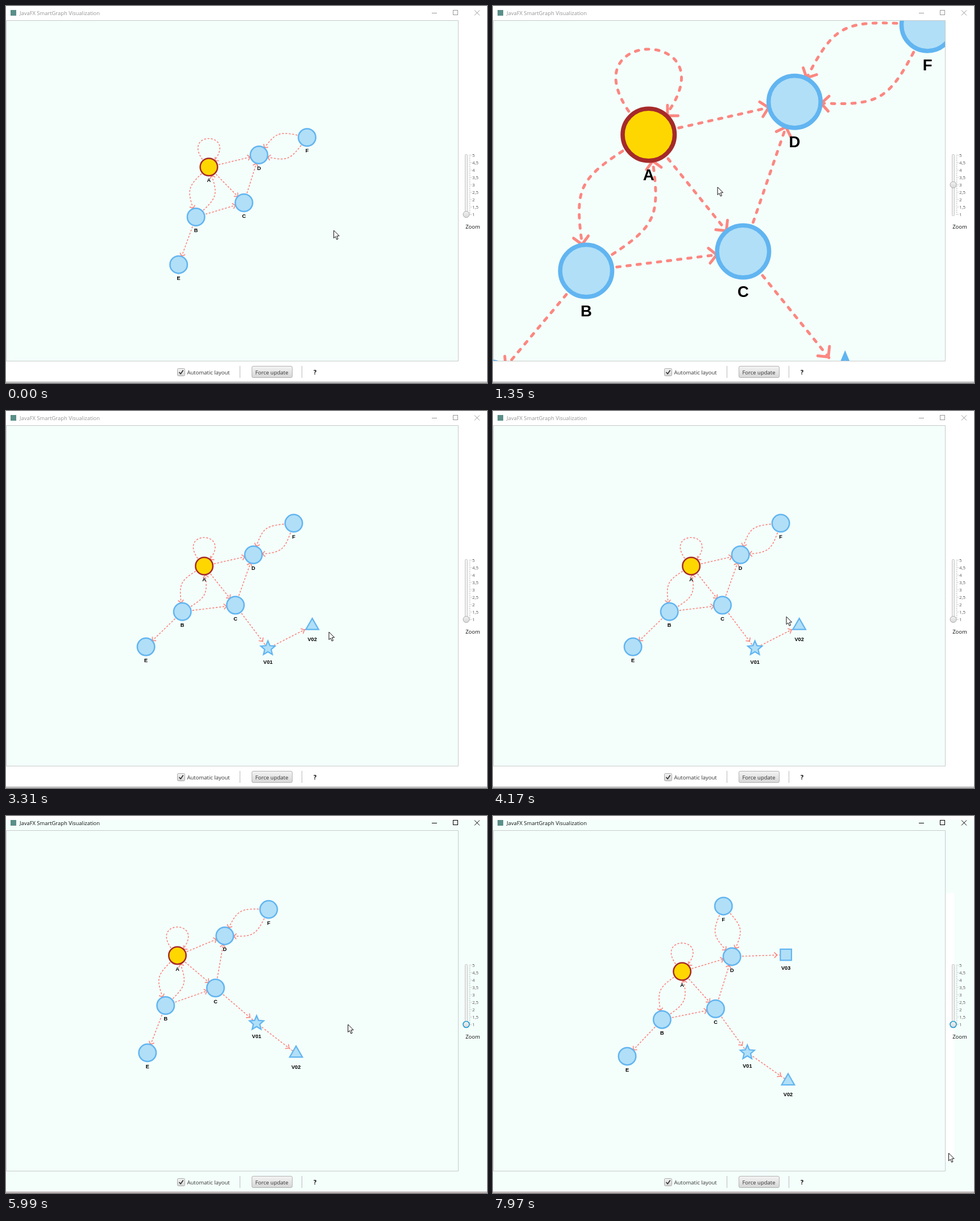
Animation of 846 by 662 pixels, one loop 8000 ms. Source, as an HTML page with a canvas:

```html
<!DOCTYPE html>
<html lang="en">
<head>
<meta charset="utf-8">
<title>Graph</title>
<style>
html, body { margin: 0; width: 100%; height: 100%; overflow: hidden; background: #fff; }
canvas { display: block; }
</style>
</head>
<body>
<canvas id="stage" width="846" height="662"></canvas>
<script>
const g = document.getElementById('stage').getContext('2d');
const MINT = '#f4fffb', LOOP = 8000, GRAB = 4550, DROP = 5150, SETTLED = 5990;
const UI = '"Open Sans", "Noto Sans", sans-serif';
const PIVOT = [398.5, 306];

// The screen refreshes in bursts of 120 ms steps.
const BURSTS = [150, 2090, 2950, 3810, 4550, 6370, 6990, 7730, 8090];

// The layout hangs on C: A, B and D fan out around it, the rest are links
// of fixed length whose angles (degrees) swing from one pose to the next.
const REST = { pull: 0, V01: 53, V02: -27, V03: -2 };
const POSES = [
  { from: 0, at: 1, x: 418.5, y: 345.5, core: 88, turn: -134.5, spread: 62, E: 110, F: -20 },
  { from: 0, at: 1350, x: 412.3, y: 347.7, core: 92.7, turn: -129, spread: 58, E: 130, F: -30, V01: 51 },
  { from: 1600, at: 3310, x: 403.5, y: 341, core: 94, turn: -128.6, spread: 58.3, E: 136, F: -38 },
  { from: GRAB, at: 5030, x: 330, y: 274.5, core: 90.3, turn: -135.4, spread: 52.5, E: 80, F: 2, V01: 40, V02: 32, pull: 1 },
  { from: 5030, at: SETTLED, x: 368.5, y: 302, core: 93, turn: -139.6, spread: 59.7, E: 111, F: -31, V01: 40.5, V02: 37.5 },
  { from: SETTLED, at: 7970, x: 391.5, y: 338.5, core: 96, turn: -132, spread: 59.4, E: 133.6, F: -99.5, V01: 54, V02: 35 }
].map(p => ({ ...REST, ...p }));

// Links: child, parent, length, share it stretches by when pulled, birth time.
const LINKS = [['E', 'B', 89, 0.2, 0], ['F', 'D', 90, 0.22, 0], ['V01', 'C', 95, 0.41, 630],
  ['V02', 'V01', 87.5, 0.09, 2570], ['V03', 'D', 95, 0, 6490]];

// Edges: from, to, bend (0 straight, +1 or -1 curved to a side).
const EDGES = [['A','D',0], ['A','C',0], ['A','B',1], ['B','A',1], ['B','C',0], ['B','E',0], ['C','D',0],
  ['F','D',1], ['F','D',-1], ['C','V01',0], ['V01','V02',0], ['D','V03',0]];

const POINTER = [
  { from: 0, at: 1, x: 576.5, y: 394 },
  { from: 150, at: 1350, x: 395, y: 318 },
  { from: 1350, at: 2090, x: 398.5, y: 307 },
  { from: 2090, at: 3310, x: 568, y: 388 },
  { from: 4000, at: GRAB, x: 339.5, y: 270 },
  { from: GRAB, at: 5030, x: 110, y: 111 },
  { from: 5030, at: DROP, x: 88, y: 93 },
  { from: DROP, at: SETTLED, x: 601.5, y: 366 },
  { from: SETTLED, at: 6850, x: 636, y: 420 },
  { from: 6850, at: 7970, x: 801.5, y: 592 }
];

const clamp = (v, lo = 0, hi = 1) => Math.min(hi, Math.max(lo, v));
const ease = u => u * u * (3 - 2 * u);
const mix = (a, b, u) => a + (b - a) * u;
const polar = ([x, y], r, deg) => [x + r * Math.cos(deg * Math.PI / 180), y + r * Math.sin(deg * Math.PI / 180)];

function steppedTime(t) {
  const i = BURSTS.findLastIndex(b => b <= t);
  if (i < 0) return 0;
  const last = Math.floor((BURSTS[i + 1] - BURSTS[i]) / 120) - 1;
  return BURSTS[i] + 120 * Math.min(last, Math.floor((t - BURSTS[i]) / 120));
}

function follow(keys, t) {
  return keys.reduce((state, key) => {
    const u = ease(clamp((t - key.from) / (key.at - key.from)));
    return Object.fromEntries(Object.keys(key).map(k => [k, mix(state[k], key[k], u)]));
  });
}

// A steady rise, a short plateau and a soft return.
function zoomAt(t) {
  const rise = (t - 1110) / 120, fall = Math.max(0, 2210 - t) / 120;
  return 1 + clamp(Math.min(rise, fall * fall / 4), 0, 3.25);
}

function layout(t, pointer) {
  const p = follow(POSES, t), C = [p.x, p.y];
  const nodes = {
    A: polar(C, 88, p.turn),
    B: polar(C, p.core, p.turn - p.spread),
    C,
    D: polar(C, p.core, p.turn + p.spread)
  };
  if (t >= GRAB) {
    const held = t < DROP ? pointer : follow(POINTER, DROP);
    const back = clamp((t - DROP) / (SETTLED - DROP));
    nodes.A = [mix(held.x + 9, nodes.A[0], back), mix(held.y + 2, nodes.A[1], back)];
  }
  for (const [name, parent, length, give, birth] of LINKS)
    if (t >= birth) nodes[name] = polar(nodes[parent], length * (1 + give * p.pull), p[name]);
  return nodes;
}

function path(points, close) {
  g.beginPath();
  points.forEach(([x, y]) => g.lineTo(x, y));
  if (close) g.closePath();
}

function line(x1, y1, x2, y2, color, width = 1) {
  g.strokeStyle = color;
  g.lineWidth = width;
  path([[x1, y1], [x2, y2]]);
  g.stroke();
}

function box(x, y, w, h, r, fill, stroke) {
  g.beginPath();
  g.roundRect(x, y, w, h, r);
  g.lineWidth = 1;
  g.fillStyle = fill;
  g.fill();
  g.strokeStyle = stroke;
  g.stroke();
}

function text(s, x, y, font, color = '#111', align = 'left') {
  g.font = font;
  g.fillStyle = color;
  g.textAlign = align;
  g.fillText(s, x, y);
}

function shade(y, h) {
  const s = g.createLinearGradient(0, y, 0, y + h);
  s.addColorStop(0, '#f4f4f4');
  s.addColorStop(1, '#d6d6d6');
  return s;
}

function arrow([x, y], [fromX, fromY]) {
  g.save();
  g.translate(x, y);
  g.rotate(Math.atan2(y - fromY, x - fromX));
  g.setLineDash([]);
  path([[-20, -4.4], [-15.6, 0], [-20, 4.4]]);
  g.stroke();
  g.restore();
}

function drawEdge(a, b, c1, c2) {
  g.setLineDash([2, 4]);
  g.beginPath();
  g.moveTo(...a);
  g.bezierCurveTo(...c1, ...c2, ...b);
  g.stroke();
  arrow(b, c2);
}

// Long edges bow less than short ones.
function bowPoint(a, b, bend) {
  const dx = b[0] - a[0], dy = b[1] - a[1];
  const angle = Math.max(3, 43 - 0.108 * Math.hypot(dx, dy)) * Math.PI / 180;
  const bow = bend * Math.tan(angle) / 2;
  return [a[0] + dx / 2 - dy * bow, a[1] + dy / 2 + dx * bow];
}

function polygon(center, n, radius) {
  path(Array.from({ length: n }, (_, i) => polar(center, radius(i), i / n * 360 - 90)), true);
}

function drawNode(name, [x, y]) {
  if (name === 'V01') polygon([x, y], 10, i => i % 2 ? 6 : 13.2);
  else if (name === 'V02') polygon([x, y], 3, () => 13);
  else {
    g.beginPath();
    if (name === 'V03') g.rect(x - 9.8, y - 9.8, 19.6, 19.6);
    else g.arc(x, y, 15.25, 0, 7);
  }
  g.lineWidth = name[0] === 'V' ? 2.2 : 2.5;
  g.fillStyle = name === 'A' ? '#ffd700' : '#b1dff7';
  g.strokeStyle = name === 'A' ? '#a52a2a' : '#61b5f1';
  g.fill();
  g.stroke();
}

function drawGraph(nodes, zoom) {
  g.save();
  g.beginPath();
  g.rect(1, 26, 794, 597);
  g.clip();
  g.translate(...PIVOT);
  g.scale(zoom, zoom);
  g.translate(-PIVOT[0], -PIVOT[1]);
  g.lineCap = 'round';
  g.lineWidth = 1.65;
  g.strokeStyle = '#fc8781';
  const [x, y] = nodes.A, k = 66.7;
  drawEdge(nodes.A, nodes.A, [x - k, y - k], [x + k, y - k]);
  for (const [from, to, bend] of EDGES) {
    const a = nodes[from], b = nodes[to];
    if (!a || !b) continue;
    const c = bowPoint(a, b, bend);
    drawEdge(a, b, c, c);
  }
  g.setLineDash([]);
  for (const name in nodes) drawNode(name, nodes[name]);
  for (const name in nodes) {
    const [nx, ny] = nodes[name];
    text(name, nx, ny + 26.7, 'bold 9.2px "Liberation Sans", Arial, sans-serif', '#000', 'center');
  }
  g.restore();
}

function drawWindow(t, focused) {
  const ink = focused ? '#000' : '#999';
  g.fillStyle = '#fff';
  g.fillRect(0, 0, 846, 662);
  g.fillStyle = MINT;
  if (focused) g.fillRect(0, 7, 846, 655);
  box(0.5, 25.5, 795, 598, 0, MINT, '#c6cbc9');
  if (t >= 7970) {
    g.fillStyle = '#fff';
    g.fillRect(796, 135, 15, 472);
  }
  g.fillStyle = '#5b8f89';
  g.fillRect(8, 7, 10, 10);
  text('JavaFX SmartGraph Visualization', 24, 16, '9.4px ' + UI, focused ? '#111' : '#949494');
  line(749, 12.5, 758, 12.5, ink);
  g.strokeRect(786.5, 7.5, 8, 8);
  line(824, 7.5, 833, 16.5, ink);
  line(833, 7.5, 824, 16.5, ink);

  box(301.5, 636.5, 13, 13, 2, shade(636, 13), '#aaa');
  g.strokeStyle = '#333';
  g.lineWidth = 1.7;
  path([[304.5, 643], [307.2, 646], [311.7, 639.5]]);
  g.stroke();
  text('Automatic layout', 318.5, 646.5, '9.5px ' + UI, '#333');
  line(411.5, 632, 411.5, 653, '#bbb');
  box(432.5, 632.5, 71, 20, 2.5, shade(632, 20), '#b4b4b4');
  text('Force update', 467.5, 646.5, '9.5px ' + UI, '#333', 'center');
  line(520.5, 632, 520.5, 653, '#bbb');
  text('?', 543.5, 647, 'bold 10.5px ' + UI, '#000', 'center');
  line(0, 660.5, 846, 660.5, focused ? '#7d5c61' : '#6a6a6a');
}

function drawSlider(zoom, focused) {
  box(807.5, 260.5, 4, 108, 2, '#f2f2f2', '#c4c4c4');
  for (let i = 0; i <= 32; i++) {
    const y = 366 - i * 3.25;
    line(814, y, i % 4 ? 817 : 819, y, '#bbb', 0.8);
  }
  for (let v = 1; v <= 5; v += 0.5)
    text(String(v).replace('.', ','), 820, 369 - 26 * (v - 1), '7.9px ' + UI, '#555');
  text('Zoom', 821, 391, '9.5px ' + UI, '#111', 'center');
  const y = 366 - 26 * (zoom - 1);
  g.beginPath();
  g.arc(809.5, y, 5.5, 0, 7);
  g.fillStyle = shade(y - 6, 12);
  g.fill();
  g.strokeStyle = focused ? '#1e9bd0' : '#aaa';
  g.lineWidth = focused ? 1.6 : 1;
  g.stroke();
}

function drawPointer({ x, y }, dragging) {
  g.save();
  g.translate(x, y);
  if (dragging) {
    const arm = [[1.2, -1.2], [5, -1.2], [5, -3.6], [9, 0], [5, 3.6], [5, 1.2], [1.2, 1.2]];
    path([0, 1, 2, 3].flatMap(q => arm.map(([px, py]) => {
      for (let i = 0; i < q; i++) [px, py] = [-py, px];
      return [px, py];
    })), true);
  } else {
    path([[0, 0], [0, 13.6], [3, 10.8], [5.2, 16], [7.5, 15], [5.3, 9.9], [9.6, 9.7]], true);
  }
  g.fillStyle = '#fff';
  g.fill();
  g.strokeStyle = '#111';
  g.lineWidth = 1;
  g.stroke();
  g.restore();
}

function draw() {
  const t = steppedTime(performance.now() % LOOP);
  const focused = t >= GRAB, zoom = zoomAt(t), pointer = follow(POINTER, t);
  drawWindow(t, focused);
  drawGraph(layout(t, pointer), zoom);
  drawSlider(zoom, focused);
  drawPointer(pointer, focused && t < DROP);
  requestAnimationFrame(draw);
}
draw();
</script>
</body>
</html>
```
